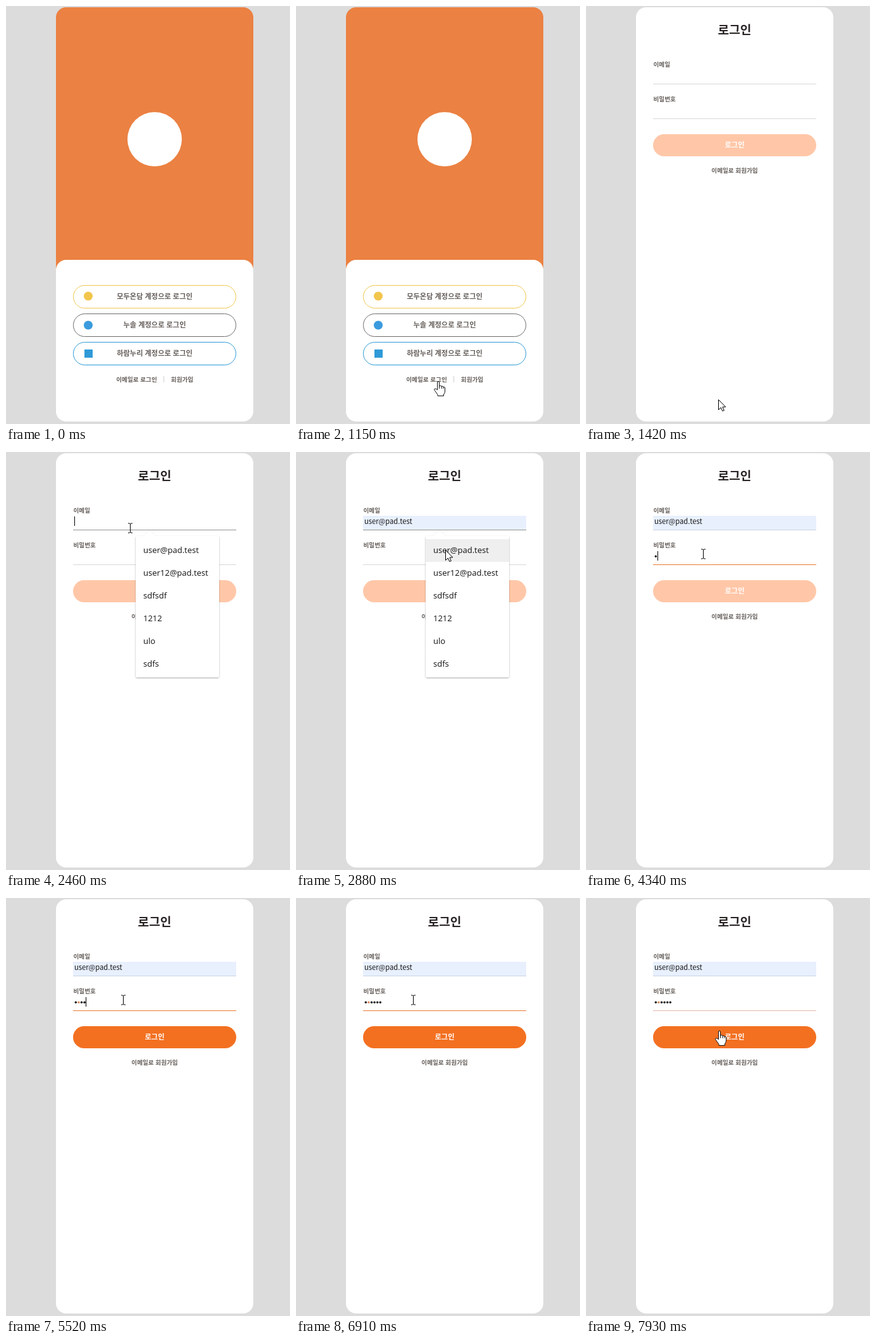
These frames come from a looping animation (449 px wide and 662 px high, 8 s). An HTML page:

```html
<!DOCTYPE html>
<html lang="ko">
<head>
<meta charset="utf-8">
<title>로그인</title>
<style>
html, body { margin: 0; width: 100%; height: 100%; overflow: hidden; background: #dcdcdc; }
svg { display: block; width: 449px; height: 662px; }
text { font-family: "Noto Sans CJK KR", "Noto Sans CJK", "Noto Sans KR", sans-serif; font-size: 11.2px; fill: #665f5b; }
.mid { text-anchor: middle; }
.bold { font-weight: 700; }
.small { font-size: 9.6px; font-weight: 700; }
.title { font-size: 19.2px; font-weight: 700; fill: #2b2525; }
.value { fill: #151515; }
.option { font-family: "Open Sans", sans-serif; font-size: 13px; fill: #111; }
</style>
</head>
<body>
<svg viewBox="0 0 449 662">
  <defs>
    <filter id="shadow" x="-10%" y="-10%" width="120%" height="120%">
      <feDropShadow dx="0" dy="1" stdDeviation="1.3" flood-color="#000" flood-opacity=".35"/>
    </filter>
  </defs>
  <rect width="449" height="662" fill="#dcdcdc"/>

  <g id="welcome">
    <rect x="79" y="2" width="312" height="440" rx="16" fill="#eb8142"/>
    <rect x="79" y="402" width="312" height="256" rx="16" fill="#fff"/>
    <circle cx="235" cy="211" r="43" fill="#fff"/>
    <g id="accounts"></g>
    <circle cx="130" cy="459.5" r="7" fill="#f2c54c"/>
    <circle cx="130" cy="505.5" r="7" fill="#3b9bdd"/>
    <rect x="124" y="544" width="13" height="13" fill="#2f9ad8"/>
    <text class="small mid" x="206.5" y="595">이메일로 로그인</text>
    <path d="M249.5 586V596" stroke="#cfcfcf"/>
    <text class="small mid" x="278.5" y="595">회원가입</text>
  </g>

  <g id="form">
    <rect x="79" y="2" width="312" height="656" rx="16" fill="#fff"/>
    <text class="title mid" x="235" y="44.5">로그인</text>
    <text class="small" x="106.5" y="95.7">이메일</text>
    <text class="small" x="106.5" y="150.7">비밀번호</text>
    <g id="filled">
      <rect x="106" y="101" width="258" height="22" fill="#e8f0fe"/>
      <text class="value" x="108" y="114">user@pad.test</text>
    </g>
    <path id="emailLine" d="M106 123.5H364"/>
    <path id="passLine" d="M106 178.5H364"/>
    <g id="dots"></g>
    <path id="caret" stroke="#000"/>
    <rect id="button" x="106" y="203" width="258" height="35" rx="17.5"/>
    <text class="bold mid" x="235" y="223.7" style="fill:#fff">로그인</text>
    <text class="small mid" x="235" y="263.8">이메일로 회원가입</text>
    <g id="menu">
      <path d="M208 133H217.500L224.500 126.500Q227 124.300 229.500 126.500L236.500 133H334Q337 133 337 136V354Q337 357 334 357H208Q205 357 205 354V136Q205 133 208 133Z" fill="#fff" filter="url(#shadow)"/>
      <rect id="hover" x="205" y="138" width="132" height="36" fill="#efefef"/>
    </g>
  </g>

  <g id="cursor">
    <path id="arrow" d="M.5 .5V16.500L4.300 13L6.800 18.500L9.300 17.400L6.900 12H11.800Z" fill="#fff" stroke="#000"/>
    <path id="beam" d="M-3.500 -7.500H-1L0 -6.500L1 -7.500H3.500M0 -6.500V6.500M-3.500 7.500H-1L0 6.500L1 7.500H3.500" fill="none" stroke="#000"/>
    <path id="hand" d="M-1.500 14V2Q-1.500 .5 0 .5T1.500 2V8Q4.500 6 5 8.500Q7.500 7 8 9.500Q10.500 8.500 10.500 11V16Q10.500 19 8.500 21V23.500H-1V21.500L-6 14.500Q-7 12.500 -5.500 12Q-4 11.500 -1.500 14ZM1.500 8V12M5 8.500V12M8 9.500V12" fill="#fff" stroke="#111" stroke-linejoin="round"/>
  </g>
</svg>
<script>
const LOOP = 8000;
const $ = id => document.getElementById(id);
const clamp = v => Math.max(0, Math.min(1, v));
const smooth = v => v * v * (3 - 2 * v);
const ease = v => 1 - (1 - v) ** 2.2;
const show = (id, on) => $(id).setAttribute("display", on ? "inline" : "none");

function add(parent, tag, attrs, text = "") {
  const el = document.createElementNS("http://www.w3.org/2000/svg", tag);
  for (const k in attrs) el.setAttribute(k, attrs[k]);
  el.textContent = text;
  return $(parent).appendChild(el);
}

[["모두온담", "#f0c64f"], ["누솔", "#6d6d6d"], ["하람누리", "#2d9ad6"]].forEach(([name, color], i) => {
  const y = 442.5 + 45 * i;
  add("accounts", "rect", { x: 106.5, y, width: 257, height: 36, rx: 18, fill: "#fff", stroke: color });
  add("accounts", "text", { class: "bold mid", x: 235, y: y + 21.6 }, name + " 계정으로 로그인");
});

["user@pad.test", "user12@pad.test", "sdfsdf", "1212", "ulo", "sdfs"].forEach((label, i) =>
  add("menu", "text", { class: "option", x: 217, y: 160 + 36 * i }, label));

const keyTimes = [4340, 4800, 5180, 5520, 6180, 6380];
const dots = keyTimes.map((_, i) =>
  add("dots", "circle", { cx: 110.3 + 4.6 * i, cy: 165.3, r: 1.7, fill: i === 1 ? "#d98a5c" : "#111" }));

// time, x, y, pointer shape from then on
const path = [
  [590, 432, 560, "arrow"], [900, 300, 580, "arrow"], [1080, 232, 594, "hand"],
  [1150, 225, 594, "hand"], [1330, 225, 594, "hand"], [1350, 222, 602, "arrow"],
  [1420, 209, 623, "arrow"], [1480, 209, 621, "arrow"], [2040, 198, 128, "beam"],
  [2110, 196, 120, "beam"], [2530, 196, 120, "beam"], [2600, 206, 134, "arrow"],
  [2800, 236, 155, "arrow"], [3020, 236, 155, "arrow"], [3300, 182, 150, "arrow"],
  [3370, 182, 150, "arrow"], [3440, 184, 158, "beam"], [3510, 185, 161, "beam"],
  [7370, 185, 161, "beam"], [7480, 191, 182, "arrow"], [7580, 202, 208, "hand"],
  [7720, 213, 231, "hand"], [7860, 211, 210, "hand"], [8001, 211, 210, "hand"]
];

// colour stops: [time, [r, g, b]]
const line = [216, 216, 216], orange = [234, 121, 49];
const emailStops = [[2180, line], [2440, [148, 148, 148]], [2950, [148, 148, 148]], [3300, [176, 191, 208]], [3700, [201, 211, 228]]];
const passStops = [[3650, line], [4250, orange], [7800, orange], [7930, [223, 185, 170]], [8000, line]];
const buttonStops = [[4340, [255, 199, 168]], [5250, [243, 112, 33]]];

function colorAt(stops, t, curve = v => v) {
  let i = stops.findIndex(s => s[0] > t);
  if (i === 0) return `rgb(${stops[0][1]})`;
  if (i < 0) return `rgb(${stops[stops.length - 1][1]})`;
  const [t0, a] = stops[i - 1], [t1, b] = stops[i];
  const k = curve((t - t0) / (t1 - t0));
  return `rgb(${a.map((v, j) => Math.round(v + (b[j] - v) * k))})`;
}

function drawCursor(t) {
  show("cursor", t >= path[0][0]);
  if (t < path[0][0]) return;
  const i = path.findIndex(p => p[0] > t);
  const [t0, x0, y0, shape] = path[i - 1], [t1, x1, y1] = path[i];
  const raw = (t - t0) / (t1 - t0);
  const k = t1 - t0 > 250 ? smooth(raw) : raw;
  const x = Math.round(x0 + (x1 - x0) * k), y = Math.round(y0 + (y1 - y0) * k);
  const half = shape === "beam" ? 0.5 : 0;
  $("cursor").setAttribute("transform", `translate(${x + half} ${y + half})`);
  for (const s of ["arrow", "beam", "hand"]) show(s, s === shape);
}

function drawCaret(t, typed) {
  const inEmail = t >= 2180 && t < 2740, inPass = t >= 3650 && t < 7860;
  const since = inEmail ? 2180 : typed ? keyTimes[typed - 1] : 3650;
  show("caret", (inEmail || inPass) && Math.floor((t - since) / 530) % 2 === 0);
  const x = 108.5 + Math.round(4.6 * typed), y = inEmail ? 102 : 157;
  $("caret").setAttribute("d", `M${x} ${y}v15`);
}

function draw(t) {
  show("welcome", t < 1350);
  show("form", t >= 1350);

  const typed = keyTimes.filter(k => k <= t).length;
  dots.forEach((d, i) => d.setAttribute("display", i < typed ? "inline" : "none"));
  drawCaret(t, typed);

  show("filled", t >= 2740);
  show("hover", t >= 2680);
  show("menu", t >= 2180 && t < 3020);
  $("menu").setAttribute("opacity", clamp((t - 2130) / 150) * clamp((3020 - t) / 100));

  $("emailLine").setAttribute("stroke", colorAt(emailStops, t));
  $("passLine").setAttribute("stroke", colorAt(passStops, t));
  $("button").setAttribute("fill", colorAt(buttonStops, t, ease));
  drawCursor(t);
}

const start = performance.now();
function tick() {
  draw((performance.now() - start) % LOOP);
  requestAnimationFrame(tick);
}
tick();
</script>
</body>
</html>
```
